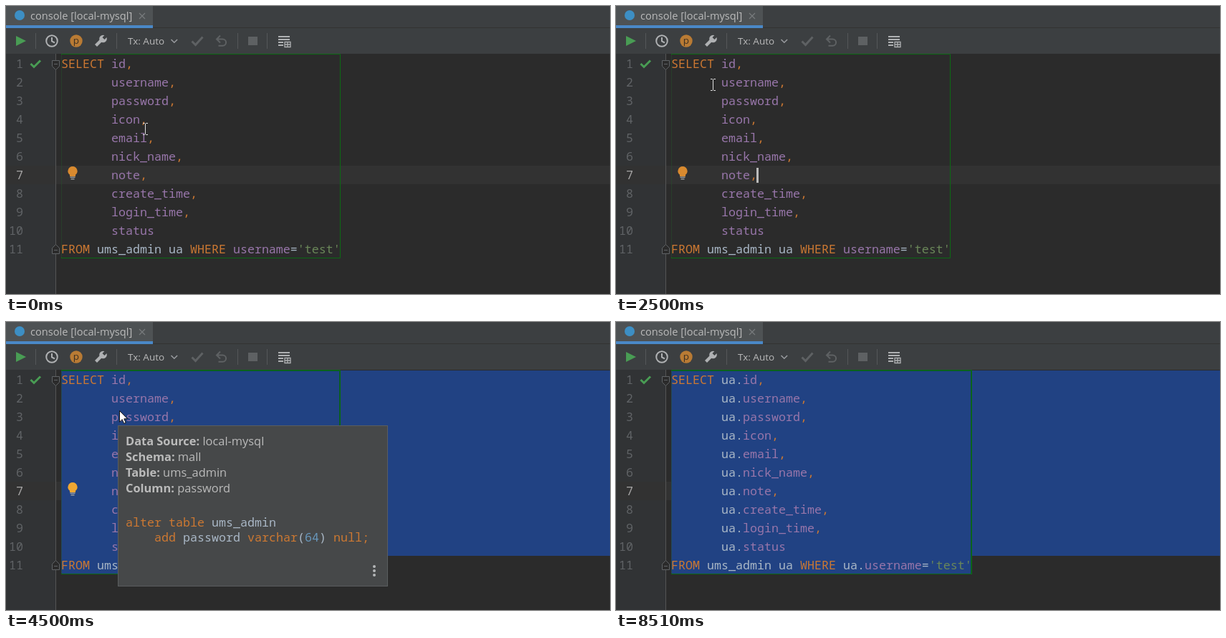
These frames come from a looping animation (843x404 px, 9.01 s). An HTML page:

```html
<!DOCTYPE html>
<html lang="en">
<head>
<meta charset="utf-8">
<title>SQL console</title>
<style>
  html, body { margin: 0; width: 100%; height: 100%; overflow: hidden; background: #2b2b2b; }
  svg { display: block; width: 843px; height: 404px; }
  text { white-space: pre; font-family: "Open Sans", "Noto Sans", "Noto Sans CJK SC", "Noto Sans CJK", sans-serif; fill: #bbb; }
  .code { font: 16.667px "Noto Sans Mono", "Noto Sans CJK SC", "Noto Sans CJK", monospace; fill: #a9b7c6; }
  .num { text-anchor: end; fill: #606366; }
  .doc { font-size: 16.4px; }
  .menu { font-size: 14.4px; }
  .line { fill: none; stroke: #afb1b3; stroke-width: 2; }
  .off { stroke: #5e6163; }
</style>
</head>
<body>
<svg id="stage" viewBox="0 0 843 404" xmlns="http://www.w3.org/2000/svg"></svg>
<script>
const LOOP = 9010;
const KEYWORDS = /^(SELECT|FROM|WHERE|alter|table|add|varchar|null|comment)$/;
const COLUMNS = ['id', 'username', 'password', 'icon', 'email', 'nick_name',
  'note', 'create_time', 'login_time', 'status'];

const rect = (x, y, w, h, fill, more = '') =>
  `<rect x="${x}" y="${y}" width="${w}" height="${h}" fill="${fill}" ${more}/>`;
const path = (d, more = 'class="line"') => `<path d="${d}" ${more}/>`;
const text = (x, y, body, more = '') => `<text x="${x}" y="${y}" ${more}>${body}</text>`;
const group = (id, body, more = '') => `<g id="${id}" ${more}>${body}</g>`;
const baseline = row => 87 + 26 * row;

function tokenColor(token, nameColor) {
  if (KEYWORDS.test(token) || /[,;]/.test(token) && token.length === 1) return '#cc7832';
  if (token[0] === "'") return '#6a8759';
  if (/^\d/.test(token)) return '#6897bb';
  if (/^\w/.test(token) && !/^(ums_admin|ua)$/.test(token)) return nameColor;
  return '#a9b7c6';
}

function code(x, y, source, nameColor = '#9876aa') {
  const tokens = source.match(/'[^']*'|\w+|\s+|./g);
  const spans = tokens.map(t => `<tspan fill="${tokenColor(t, nameColor)}">${t}</tspan>`);
  return text(x, y, spans.join(''), 'class="code"');
}

function query(prefix) {
  const rows = COLUMNS.map((name, i) =>
    code(147, baseline(i), prefix + name + (i < COLUMNS.length - 1 ? ',' : '')));
  return code(77, baseline(0), 'SELECT') + rows.join('') +
    code(77, baseline(10), `FROM ums_admin ua WHERE ${prefix}username='test'`);
}

function toolbar() {
  const separators = [41, 154, 323, 364].map(x => rect(x, 38, 1, 22, '#555759')).join('');
  return rect(0, 0, 843, 67, '#3c3f41') + rect(205, 30, 638, 1, '#323232') +
    rect(0, 0, 205, 27, '#4e5254') + '<rect id="underline" y="27" width="205" height="4"/>' +
    '<circle cx="19" cy="13" r="7" fill="#3d8fc4"/>' +
    text(34, 19, 'console [local-mysql]', 'font-size="14.6"') +
    path('M186 10l8 8m0-8l-8 8', 'fill="none" stroke="#777b7d" stroke-width="1.2"') +
    separators +
    path('M14 42L28 49L14 56Z', 'fill="#499c54"') +
    '<circle cx="64" cy="49" r="7.8" class="line"/>' + path('M64 44v5.5l4 2') +
    '<circle cx="98" cy="49" r="8.7" fill="#b97b34"/>' +
    text(98, 53, 'p', 'font-size="13.5" text-anchor="middle" style="fill:#3c3022"') +
    path('M125.5 55.5L134 47', 'stroke="#afb1b3" stroke-width="4.2"') +
    '<circle cx="135.5" cy="46" r="5.3" fill="#afb1b3"/>' +
    path('M136 45.5L142 39.5', 'stroke="#3c3f41" stroke-width="4.2"') +
    text(170, 54, 'Tx: Auto', 'font-size="13.5"') +
    path('M230.5 47l4.3 4.3l4.3-4.3', 'fill="none" stroke="#9a9da0" stroke-width="1.5"') +
    path('M259.5 49.5l5 5l10-11', 'class="line off" style="stroke-width:3"') +
    path('M299 41.5l-5 5l5 5M294.5 46.5h8a4.6 4.6 0 0 1 0 9.2h-6', 'class="line off"') +
    rect(338, 43, 13, 12, '#5e6163') +
    path('M380 43h16M380 47h16M380 51h7M380 55h7', 'class="line"') +
    path('M389 50.5h8v7h-8zM389 54h8M393 50v7', 'fill="none" stroke="#afb1b3" stroke-width="1.3"');
}

function gutter() {
  const numbers = Array.from({ length: 11 }, (_, i) =>
    text(24, baseline(i), i + 1, `class="code num" ${i === 6 ? 'style="fill:#a4a3a3"' : ''}`));
  const fold = 'fill="#2b2b2b" stroke="#606366"';
  return rect(0, 67, 69, 337, '#313335') + rect(0, 224, 843, 26, '#323232') +
    rect(69, 67, 1, 337, '#555') + numbers.join('') +
    path('M34.5 81l4.5 4.5l9-9', 'fill="none" stroke="#499c54" stroke-width="3"') +
    path('M64.5 76.5h10v8l-5 5l-5-5zM67 81.5h5', fold) +
    path('M64.5 347.5h10v-8l-5-5l-5 5zM67 342.5h5', fold);
}

const bulb = path('M93 225a6.6 6.6 0 0 1 4 11.8v2.2h-8v-2.2a6.6 6.6 0 0 1 4-11.8z') .replace('class="line"', '') +
  rect(89.5, 239.5, 7, 1.5, '#a0a2a4') + rect(90.5, 242, 5, 1.4, '#a0a2a4');

function docPopup(x, y, w, h, column, sql, note) {
  const facts = [['Data Source', 'local-mysql'], ['Schema', 'mall'], ['Table', 'ums_admin'], ['Column', column]];
  const sqlY = y + (note ? 164 : 142);
  return rect(x + .5, y + .5, w - 1, h - 1, '#464849', 'stroke="#5a5d5f"') +
    facts.map(([key, value], i) => text(x + 11, y + 28 + 22 * i,
      `<tspan font-weight="700">${key}:</tspan> ${value}`, 'class="doc"')).join('') +
    (note ? text(x + 11, y + 138, '-- ' + note, 'class="doc" style="fill:#808080"') : '') +
    code(x + 11, sqlY, 'alter table ums_admin', '#a9b7c6') +
    code(x + 51, sqlY + 21, sql, '#a9b7c6') +
    [28, 22, 16].map(d => `<circle cx="${x + w - 19}" cy="${y + h - d}" r="2" fill="#b4b6b8"/>`).join('');
}

function menu(selected) {
  const items = ["Enable 'In SELECT expressions'", "Flip ','", 'Qualify identifier', 'Adjust code style settings'];
  const rows = items.map((label, i) => {
    const mid = 264 + 25 * i;
    const arrow = i === 1 || i === 2
      ? path(`M426.5 ${mid - 5}l8 5l-8 5z`, `fill="${i === selected ? '#fff' : '#a4a6a8'}"`) : '';
    return (i === selected ? rect(197, mid - 13, 250, 25, '#4b6eaf') : '') +
      path(`M210 ${mid - 5}h9M210 ${mid - 1}h5`, 'stroke="#afb1b3" stroke-width="1.7"') +
      path(`M213 ${mid + 5}l1-4l8-7l2.8 2.8l-8 7z`, 'fill="#afb1b3"') +
      text(230, mid + 5, label, 'class="menu"') + arrow;
  });
  return rect(196.5, 249.5, 251, 122, '#3c3f41', 'stroke="#5a5d5f"') + rows.join('') +
    rect(197, 352, 250, 19, '#45484a') + rect(197, 351, 250, 1, '#525557') +
    text(203, 366, 'Press Ctrl+Shift+I to open preview', 'font-size="12.75" style="fill:#8c8c8c"');
}

const pointers =
  group('ibeam', path('M-3.5-7.5h2.5l1 1l1-1h2.5M0-7V7.5M-3.5 8.5h2.5l1-1l1 1h2.5', 'fill="none"')) +
  group('arrow', path('M.5.5V16.2L4.2 12.7L6.7 18.4L9.2 17.3L6.8 11.8H11.5Z', 'fill="#fff" stroke="#111"')) +
  group('hand', '<circle cx="-2" cy="-1" r="11.3" fill="#d3c626" opacity=".78"/>' +
    path('M-2 1.5q0-2 1.8-2t1.8 2v6q1.5-1 3 .6q1.6-.8 2.8.8q2.2-.4 2.2 2v5q0 3-2 5v2.6h-8.6v-2.4L-7 13.5q-1.2-2.4 1-2.9q1.6 0 4 3z',
      'fill="#fff" stroke="#111"') +
    path('M1.6 8v5M4.6 9v4M7.3 10v3', 'stroke="#333" stroke-width=".8"'));

document.getElementById('stage').innerHTML =
  rect(0, 0, 843, 404, '#2b2b2b') + toolbar() + gutter() +
  group('selection', rect(77, 68, 766, 260, '#214283') + '<rect id="lastRow" x="77" y="328" height="26" fill="#214283"/>') +
  '<path id="frame" fill="none" stroke="#0b6a13"/>' +
  path('M77.5 68V353', 'stroke="#24502a" stroke-dasharray="1 1"') +
  '<path id="innerFrame" fill="none" stroke="#0a5a26"/>' +
  group('plainQuery', query('')) + group('aliasQuery', query('ua.')) +
  group('bulb', bulb) +
  '<rect id="caret" y="227" width="3" height="21" fill="#bbb"/>' +
  group('emailDoc', docPopup(186, 197, 494, 226, 'email', "add email varchar(100) null comment '邮箱';", '邮箱')) +
  group('passwordDoc', docPopup(156, 145, 377, 226, 'password', 'add password varchar(64) null;')) +
  group('firstMenu', menu(0)) + group('thirdMenu', menu(2)) + pointers;

// Each step lists only what changes at that time.
const STEPS = [
  [0, { pointer: 'ibeam', x: 194.5, y: 172, caret: false, bulb: '#d98a2f', selected: false, popup: '', alias: false, focus: true }],
  [500, { x: 186.5, y: 173, caret: true }],
  [1000, { popup: 'emailDoc' }],
  [1500, { x: 175.5, y: 171, popup: '' }],
  [2000, { x: 130.5, y: 104, caret: false }],
  [2500, { x: 135.5, y: 110, caret: true }],
  [3000, { x: 138.5, y: 119, selected: true, bulb: '' }],
  [3500, { pointer: 'arrow', x: 158, y: 124 }],
  [4000, { caret: false, bulb: '#f0a732' }],
  [4500, { popup: 'passwordDoc' }],
  [5500, { popup: 'firstMenu', focus: false }],
  [6500, { x: 306, y: 148 }],
  [7000, { pointer: 'hand', x: 308, y: 317, popup: 'thirdMenu' }],
  [7500, { pointer: 'arrow', x: 306, y: 315, popup: '', alias: true, focus: true, caret: true, bulb: '' }],
  [8010, { pointer: '' }],
  [8510, { caret: false }],
];

const $ = id => document.getElementById(id);
const show = (id, on) => $(id).setAttribute('display', on ? 'inline' : 'none');

function render(time) {
  const s = Object.assign({}, ...STEPS.filter(([at]) => at <= time).map(([, change]) => change));
  const right = s.alias ? 497 : 467;
  show('plainQuery', !s.alias);
  show('aliasQuery', s.alias);
  show('selection', s.selected);
  show('innerFrame', s.selected);
  show('caret', s.caret);
  show('bulb', s.bulb);
  for (const id of ['emailDoc', 'passwordDoc', 'firstMenu', 'thirdMenu']) show(id, id === s.popup);
  for (const id of ['ibeam', 'arrow', 'hand']) {
    show(id, id === s.pointer);
    $(id).setAttribute('transform', `translate(${s.x} ${s.y})`);
  }
  $('bulb').setAttribute('fill', s.bulb || 'none');
  $('ibeam').setAttribute('stroke', s.selected ? '#d08060' : '#e0e0e0');
  $('underline').setAttribute('fill', s.focus ? '#4a88c7' : '#747a80');
  $('lastRow').setAttribute('width', right - 77);
  $('frame').setAttribute('d', `M77 67.5H${right - .5}V353.5H77`);
  $('innerFrame').setAttribute('d', `M78 68.5H${right - 1.5}V353`);
  $('caret').setAttribute('x', s.alias ? 226 : 196);
}

function tick() {
  render(performance.now() % LOOP);
  requestAnimationFrame(tick);
}
tick();
</script>
</body>
</html>
```
